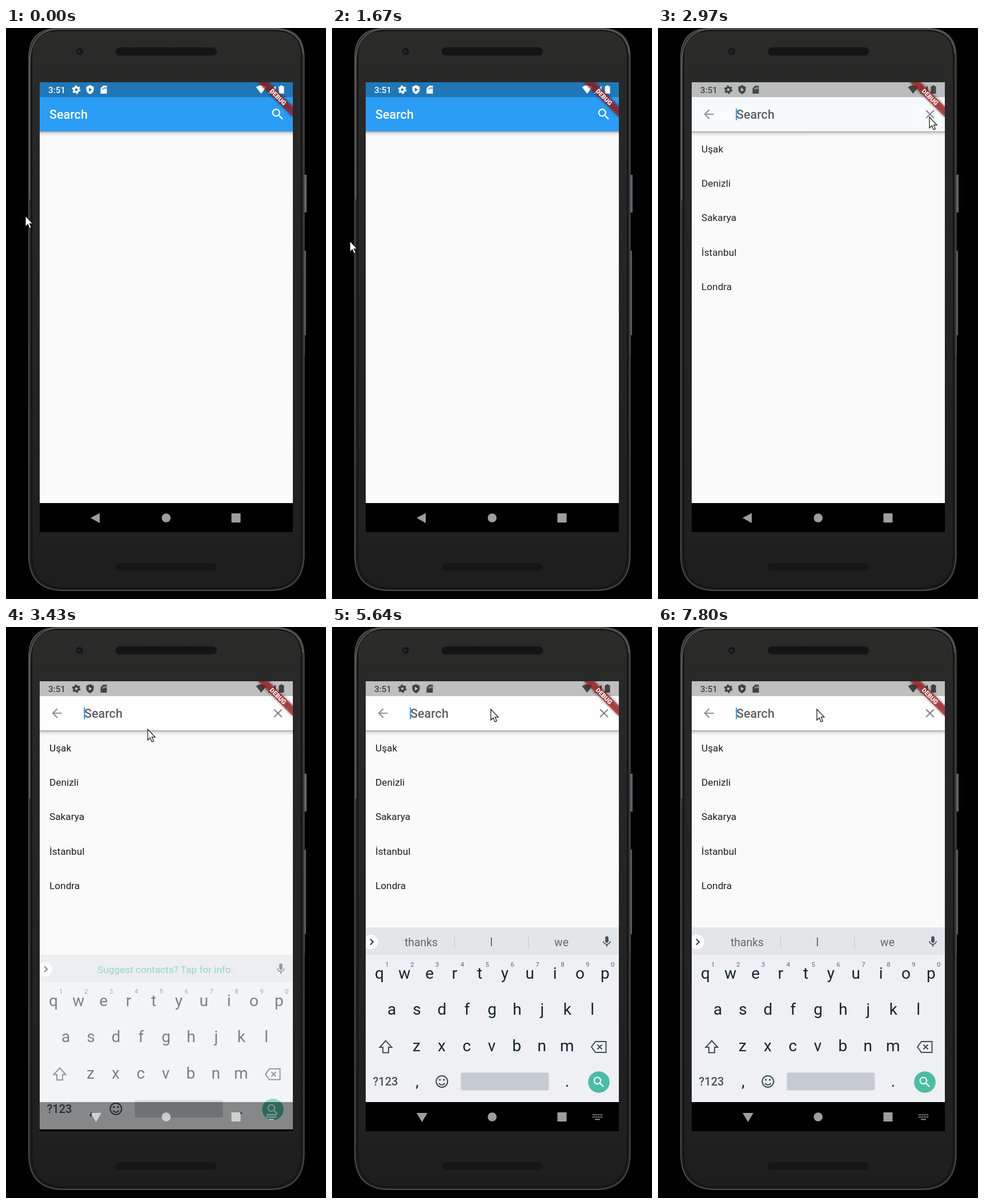
These frames come from a looping animation (560 px wide and 1000 px high, 8 s). An HTML page:

```html
<!DOCTYPE html>
<html lang="en">
<head>
<meta charset="utf-8">
<title>Search page</title>
<style>
html, body { margin: 0; width: 100%; height: 100%; overflow: hidden; background: #000; }
svg { display: block; width: 560px; height: 1000px; font-family: Roboto, sans-serif; }
.mid { text-anchor: middle; }
.line { fill: none; stroke: #3f4d56; stroke-width: 2; }
</style>
</head>
<body>
<svg viewBox="0 0 560 1000">
  <defs>
    <linearGradient id="body" x2="0" y2="1">
      <stop offset="0" stop-color="#2b2b2a"/><stop offset=".12" stop-color="#282828"/>
      <stop offset=".9" stop-color="#202021"/><stop offset="1" stop-color="#1d1d1e"/>
    </linearGradient>
    <linearGradient id="drop" x2="0" y2="1">
      <stop offset="0" stop-opacity=".36"/><stop offset=".35" stop-opacity=".13"/><stop offset="1" stop-opacity="0"/>
    </linearGradient>
    <clipPath id="screen"><path d="M59 95H502V883H59Z"/></clipPath>
    <filter id="blur" x="-20%" y="-100%" width="140%" height="300%"><feGaussianBlur stdDeviation="2.5"/></filter>
    <g id="status">
      <text x="74" y="113.500" font-size="15.200" font-weight="500">3:51</text>
      <circle cx="123" cy="108" r="4" fill="none" stroke="currentColor" stroke-width="3.400"/>
      <circle cx="123" cy="108" r="6.200" fill="none" stroke="currentColor" stroke-width="2.400" stroke-dasharray="3.250"/>
      <path fill-rule="evenodd" d="M147 100L153.500 103V108Q153 113.500 147 116Q141 113.500 140.500 108V103ZM145 104.500V111.500L150.500 108Z"/>
      <path fill-rule="evenodd" d="M170 101H176.500V115H165.500V105.500ZM169 105V108H170.300V105ZM171.500 103.500V107H172.800V103.500ZM174 103.500V107H175.300V103.500Z"/>
      <path d="M437.500 103.500Q446.500 97 455.500 103.500L446.500 115Z"/>
      <path d="M458 115L472 101V115Z"/>
      <path d="M480 100.500H484V102H486.500V115H477.500V102H480Z"/>
    </g>
  </defs>

  <g id="phone">
    <path d="M522 257h4v66h-4z" fill="#64646f"/>
    <path d="M521 390h4v148h-4z" fill="#5a5a63"/>
    <path d="M521 538h2v34h-2z" fill="#444"/>
    <path id="shell" d="M87 1H475Q520 3 521.500 48V925Q520 983 464 985H97Q41 983 40 925V48Q42 3 87 1Z" fill="url(#body)" stroke="#4b4b49" stroke-width="2"/>
    <path d="M88 4.500H474Q516 6 517 48V925Q515 979 464 981H97Q46 979 45 925V48Q46 6 88 4.500Z" fill="none" stroke="#121212" stroke-width="2"/>
    <path d="M41.500 300V60Q43 5 90 2H472Q516 4 520 45" fill="none" stroke="#62625f" stroke-width="1.500"/>
    <circle cx="129" cy="41" r="6" fill="#161618"/><circle cx="128" cy="41" r="2.500" fill="#26282c"/>
    <rect x="192" y="34" width="177" height="14" rx="7" fill="#141414" stroke="#1c1c1c"/>
    <rect x="192" y="937" width="177" height="14" rx="7" fill="#151515" stroke="#1c1c1c"/>
  </g>

  <g clip-path="url(#screen)">
    <path d="M59 95H502V883H59Z"/>
    <g id="home">
      <path d="M59 95H502V832H59Z" fill="#fafafa"/>
      <path d="M59 181H502V189H59Z" fill="url(#drop)"/>
      <path d="M59 95H502V181H59Z" fill="#2b9df4"/>
      <path d="M59 95H502V121H59Z" fill="#2077b5"/>
      <use href="#status" fill="#fff" color="#fff"/>
      <text x="76" y="159" font-size="21.550" font-weight="500" fill="#fff">Search</text>
      <circle id="ripple" cx="475.500" cy="151" fill="#fff"/>
    </g>
    <g id="find">
      <path d="M59 95H502V832H59Z" fill="#fafafa"/>
      <path d="M59 181H502V189H59Z" fill="url(#drop)"/>
      <path d="M59 121H502V181H59Z" fill="#fefefe"/>
      <path d="M59 95H502V121H59Z" fill="#bfbfbf"/>
      <use href="#status" fill="#414141" color="#414141"/>
      <text x="137" y="159" font-size="21.550" font-weight="500" fill="#606060">Search</text>
      <path id="caret" d="M136.200 141H138.300V161.500H136.200Z" fill="#2b95ec"/>
      <g id="cities" font-size="17.240" fill="#1d1d1d"></g>
    </g>
    <g transform="translate(502 95) rotate(45)">
      <path d="M-43 30.200H43V43.100H-43Z" opacity=".5" filter="url(#blur)"/>
      <path d="M-43 30.200H43V43.100H-43Z" fill="#b71c1c" fill-opacity=".63"/>
      <text class="mid" y="40.600" font-size="11" font-weight="900" fill="#fff">DEBUG</text>
    </g>

    <g id="keyboard">
      <path d="M59 526H502V832H59Z" fill="#eef0f3"/>
      <path d="M59 526H502V574H59Z" fill="#e3e6e9"/>
      <circle cx="68" cy="551.500" r="12.700" fill="#fff"/>
      <path d="M67 546.500L72 551.500L67 556.500" class="line" style="stroke:#263238"/>
      <text id="offer" class="mid" x="279" y="558" font-size="17.200" fill="#45bba2">Suggest contacts? Tap for info.</text>
      <g id="words" class="mid" font-size="19.400" fill="#5b6971">
        <text x="156" y="559">thanks</text><text x="279" y="559">I</text><text x="401.500" y="559">we</text>
        <path d="M214.500 540V564M344 540V564" stroke="#c9ced1" stroke-width="1.200"/>
      </g>
      <g id="keys" class="mid" font-size="28" fill="#14242d"></g>
      <path class="line" d="M94 724.500L83.500 736H89V745.500H99V736H104.500Z"/>
      <path class="line" d="M461 726H479.500V745H461L454 735.500ZM464.500 731.500L472.500 739.500M472.500 731.500L464.500 739.500"/>
      <text class="mid" x="93.500" y="803" font-size="20" font-weight="500" fill="#44525b">?123</text>
      <circle class="line" cx="192.300" cy="796" r="10"/>
      <path class="line" d="M187 799Q192.300 805 197.600 799"/>
      <circle cx="188.800" cy="793" r="1.700" fill="#3f4d56"/><circle cx="195.800" cy="793" r="1.700" fill="#3f4d56"/>
      <rect x="225.500" y="780.500" width="154" height="31" rx="2" fill="#c6cbcf"/>
      <circle cx="467" cy="797" r="18.800" fill="#4dbca5"/>
    </g>
    <g fill="#fff" opacity=".62">
      <path id="back"/>
      <circle cx="280.300" cy="858" r="7.800"/>
      <rect x="394.500" y="850" width="16" height="16" rx="1"/>
      <g id="mini">
        <path d="M456 854.200H473M456 858.200H473" stroke="#fff" stroke-width="2" stroke-dasharray="2 1"/>
        <path d="M460 861.500h9v1.800h-9z"/>
      </g>
    </g>
  </g>
  <path id="mouse" d="M0 0V19L4.300 15L7.200 22L10.400 20.600L7.400 13.900H13Z" fill="#fff" stroke="#111" stroke-width="1.200"/>
</svg>

<script>
const el = id => document.getElementById(id);
const clamp = x => Math.max(0, Math.min(1, x));
const ramp = (t, from, to) => clamp((t - from) / (to - from));
const smooth = x => x * x * (3 - 2 * x);

function add(parent, tag, attrs, text = "") {
  const node = document.createElementNS("http://www.w3.org/2000/svg", tag);
  for (const k in attrs) node.setAttribute(k, attrs[k]);
  node.textContent = text;
  el(parent).append(node);
}

// 24-unit glyphs centred on a point
function icon(parent, d, x, y, size, fill) {
  const s = size / 24;
  add(parent, "path", { d, fill, transform: `translate(${x - size / 2} ${y - size / 2}) scale(${s})` });
}
const LENS = "M15.5 14h-.79l-.28-.27A6.47 6.47 0 0 0 16 9.500 6.500 6.500 0 1 0 9.500 16c1.610 0 3.090-.59 4.230-1.570l.27.28v.79l5 4.990L20.490 19l-4.990-5zm-6 0C7.010 14 5 11.990 5 9.500S7.010 5 9.500 5 14 7.010 14 9.500 11.990 14 9.500 14z";
const ARROW = "M20 11H7.830l5.590-5.590L12 4l-8 8 8 8 1.410-1.410L7.830 13H20z";
const CROSS = "M19 6.410L17.590 5 12 10.590 6.410 5 5 6.410 10.590 12 5 17.590 6.410 19 12 13.410 17.590 19 19 17.590 13.410 12z";
const MIC = "M12 14c1.660 0 3-1.340 3-3V5c0-1.660-1.340-3-3-3S9 3.340 9 5v6c0 1.660 1.340 3 3 3zM17.300 11c0 3-2.540 5.100-5.300 5.100S6.700 14 6.700 11H5c0 3.410 2.720 6.230 6 6.720V21h2v-3.280c3.280-.48 6-3.300 6-6.720z";
icon("home", LENS, 475.5, 151, 25.9, "#fff");
icon("find", ARROW, 89, 151, 25.9, "#929292");
icon("find", CROSS, 476, 151, 25.9, "#858585");
icon("keyboard", MIC, 481, 551, 23, "#44525b");
icon("keyboard", LENS, 467, 797, 25, "#fff");

["Uşak", "Denizli", "Sakarya", "İstanbul", "Londra"].forEach((name, i) =>
  add("cities", "text", { x: 76, y: 217.5 + i * 60.34 }, name));

[["qwertyuiop", 83, 616], ["asdfghjkl", 104.7, 679], ["zxcvbnm", 148, 743]].forEach(([row, x0, y], r) =>
  [...row].forEach((c, i) => {
    const x = x0 + i * 43.87;
    add("keys", "text", { x, y }, c);
    if (!r) add("keys", "text", { x: x + 13.3, y: 594.5, "font-size": 11.5, fill: "#5b6971" }, (i + 1) % 10);
  }));
add("keys", "text", { x: 149, y: 805 }, ",");
add("keys", "text", { x: 411.5, y: 805 }, ".");

// time, x, y of the pointer tip
const path = [
  [30, 34, 329], [830, 189, 411], [860, 189, 411], [1300, 100, 392], [1460, 100, 392],
  [1780, 6, 366], [2230, 400, 214], [2270, 400, 214], [2480, 477, 166], [2640, 475, 156],
  [3100, 475, 156], [3430, 248, 179], [3670, 278, 144]
];
function pointer(t) {
  const i = path.findIndex(p => p[0] > t);
  if (i < 1) return (i ? path[path.length - 1] : path[0]).slice(1);
  const a = path[i - 1], b = path[i], k = smooth(ramp(t, a[0], b[0]));
  return [a[1] + (b[1] - a[1]) * k, a[2] + (b[2] - a[2]) * k];
}

const fade = (id, value) => el(id).setAttribute("opacity", value);

function draw(t) {
  el("mouse").setAttribute("transform", `translate(${pointer(t)})`);

  const tap = ramp(t, 2660, 2860);
  el("ripple").setAttribute("r", 27 * smooth(tap));
  fade("ripple", tap ? .25 * (1 - ramp(t, 2820, 3000)) : 0);
  fade("find", smooth(ramp(t, 2720, 3000)));
  fade("caret", t < 3985 || Math.floor((t - 3985) / 508) % 2 ? 1 : 0);

  const rise = ramp(t, 3360, 3590);
  fade("keyboard", clamp(rise / .55));
  el("keyboard").setAttribute("transform", `translate(0 ${100 * (1 - rise) ** 2})`);
  fade("offer", 1 - ramp(t, 5240, 5360));
  fade("words", ramp(t, 5300, 5440));

  const open = t >= 3360;
  el("back").setAttribute("d", open ? "M148 851H167L157.500 867Z" : "M148 858L164 849.500V867Z");
  fade("mini", open ? 1 : 0);
}

const start = performance.now();
function tick() {
  draw((performance.now() - start) % 8000);
  requestAnimationFrame(tick);
}
tick();
</script>
</body>
</html>
```
